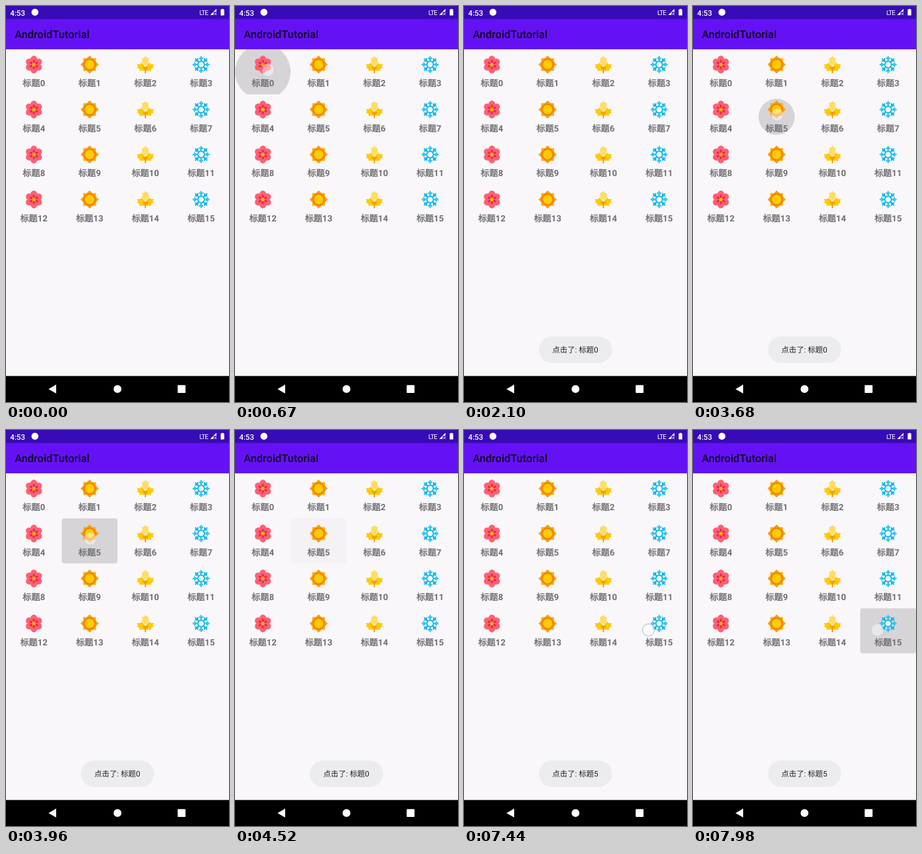
Animation, 320 px wide and 568 px high, one loop 8000 ms. Source, as an HTML page:

```html
<!DOCTYPE html>
<html lang="zh-CN">
<head>
<meta charset="utf-8">
<title>AndroidTutorial</title>
<style>
html, body { margin: 0; width: 100%; height: 100%; overflow: hidden; background: #f9f7fa; }
svg { display: block; width: 320px; height: 568px; font-family: Roboto, "Noto Sans CJK SC", "Noto Sans CJK", sans-serif; text-rendering: geometricPrecision; }
.label { font-size: 12.45px; font-weight: 700; fill: #6f6e70; text-anchor: middle; }
.han { font-weight: 400; stroke: #6f6e70; stroke-width: .45px; }
</style>
</head>
<body>
<svg viewBox="0 0 320 568">
  <defs>
    <clipPath id="cell"><rect id="cellBox" width="80" height="64.5"/></clipPath>
    <g id="flower"></g>
    <g id="sun">
      <path d="M-9.1-9.1H9.1V9.1H-9.1Z" fill="#ffab10"/>
      <path d="M0-13 13 0 0 13-13 0Z" fill="#f99d0c"/>
      <circle r="8.8" fill="#f08300"/>
      <circle r="6.7" fill="#ffcb05"/>
    </g>
    <g id="leaf">
      <path d="M0-12.6 2.2-9.8 4.8-9.6 4.4-5.5 5-3 0 1.5-5-3-4.4-5.5-4.8-9.6-2.2-9.8Z" fill="#ffdc62"/>
      <path id="lobe" d="M0 4.2-2.2.6-5.5-2.4-7.8-.6-12.2-.6-10.8 2.6-11.8 4.6-8.6 6.2-8 9.4-4.5 8.6-2 9.4 0 6.8Z" fill="#ffc905"/>
      <use href="#lobe" transform="scale(-1 1)"/>
      <path d="M0 3V12.5M0 7-3.5 3.5M0 7 3.5 3.5" fill="none" stroke="#f39a08" stroke-width="1.8"/>
    </g>
    <g id="snow"></g>
  </defs>

  <rect width="320" height="568" fill="#f9f7fa"/>
  <rect width="320" height="62.13" fill="#6412f5"/>
  <rect width="320" height="18.64" fill="#370bb5"/>
  <g fill="#fff">
    <text x="6" y="13.5" font-size="10.9" font-weight="500">4:53</text>
    <circle cx="41.5" cy="9" r="5"/>
    <text x="277.5" y="12.5" font-size="9.4" letter-spacing="-.8">LTE</text>
    <path d="M302 4V8.5H298L297.5 13H293Z"/>
    <path d="M299 9.8 302 12.8M302 9.8 299 12.8" stroke="#fff"/>
    <path d="M308 5H309.5V4H311.8V5H313.2V13.5H308Z"/>
  </g>
  <text x="12.44" y="46" font-size="15.56" font-weight="500" fill="#100722">AndroidTutorial</text>

  <circle id="ripple" clip-path="url(#cell)"/>
  <g id="grid"></g>

  <g id="toast">
    <rect x="107.5" y="474" width="105" height="38" rx="19" fill="#ececee"/>
    <text x="126.7" y="497" font-size="10.9" fill="#202021">点击了: 标题<tspan id="oldDigit">0</tspan><tspan id="newDigit" dx="-.5615em">5</tspan></text>
  </g>
  <circle id="pointer" r="8.7" fill="#fff" fill-opacity=".45" stroke="#a3bdd9"/>

  <rect y="530.7" width="320" height="37.3"/>
  <g fill="#fff">
    <path d="M61 549.4 72 543.1V555.7Z"/>
    <circle cx="160" cy="549.4" r="5.6"/>
    <rect x="246.4" y="543.8" width="11.2" height="11.2" rx=".8"/>
  </g>
</svg>
<script>
const $ = id => document.getElementById(id);
const set = (id, attrs) => { for (const k in attrs) $(id).setAttribute(k, attrs[k]); };
const ramp = (t, a, b) => Math.min(1, Math.max(0, (t - a) / (b - a)));
const smooth = p => p * p * (3 - 2 * p);
const spin = (n, draw) => Array.from({ length: n }, (_, i) => `<g transform="rotate(${i * 360 / n})">${draw(i)}</g>`).join('');
const ROW = 64.5, TOP = 62.13;

$('flower').innerHTML =
  spin(6, () => '<path d="M0 0-3.9-5.5A4.6 4.6 0 1 1 3.9-5.5Z" fill="#ff6074"/>') +
  spin(6, () => '<path d="M0 0-1.7-5Q0-9 1.7-5Z" fill="#e62a4c"/>') +
  '<circle r="2.6" fill="#fbb00a"/>';

$('snow').innerHTML = spin(8, i =>
  `<path d="M4 0H12.3M7.2 0 10-2.8M7.2 0 10 2.8" fill="none" stroke="${i % 2 ? '#12b4e8' : '#2cc4f0'}" stroke-width="1.9"/>`) +
  '<circle r="4.7" fill="#f4fbff" stroke="#1cb9ea" stroke-width="1.9"/>';

const icons = ['flower', 'sun', 'leaf', 'snow'];
$('grid').innerHTML = Array.from({ length: 16 }, (_, i) => {
  const x = 40 + i % 4 * 80, y = 84 + (i >> 2) * ROW;
  return `<use href="#${icons[i % 4]}" x="${x}" y="${y}"/><text class="label" x="${x}" y="${y + 31}"><tspan class="han">标题</tspan>${i}</text>`;
}).join('');

// show: pointer appears, down: ripple visible, start: ripple growth begins, up: release, end: ripple faded
const taps = [
  { cell: 0, x: 47.5, y: 92, show: 500, down: 560, start: 541, up: 880, end: 1300 },
  { cell: 5, x: 121, y: 156, show: 3160, down: 3680, start: 3643, up: 4080, end: 4600 },
  { cell: 15, x: 264.7, y: 286.7, show: 7440, down: 7560, start: 7540, up: 9000, end: 9400 }
];

function render(t) {
  if (t > 670 && t < 770) t = 670; // the screen stalls briefly
  const tap = taps.find(p => t >= p.show && t < p.end);
  const pressed = tap && t >= tap.down;
  const fade = tap ? 1 - ramp(t, tap.up, tap.end) : 0;

  if (tap) {
    const left = tap.cell % 4 * 80, top = TOP + (tap.cell >> 2) * ROW;
    set('cellBox', { x: left, y: top });
    set('ripple', {
      cx: left + 40, cy: top + ROW / 2,
      r: 24 + 26 * smooth(ramp(t, tap.start, tap.start + 225)),
      'fill-opacity': pressed ? .14 * fade : 0
    });
    set('pointer', {
      cx: tap.x, cy: tap.y,
      'stroke-opacity': pressed ? .25 : 1,
      opacity: (tap.cell === 5 ? ramp(t, 3140, 3300) : 1) * (1 - ramp(t, tap.up, tap.up + 120))
    });
  } else {
    set('ripple', { 'fill-opacity': 0 });
    set('pointer', { opacity: 0 });
  }

  const swap = smooth(ramp(t, 4540, 4960));
  set('toast', { opacity: smooth(ramp(t, 920, 1280)) });
  set('oldDigit', { 'fill-opacity': 1 - swap });
  set('newDigit', { 'fill-opacity': swap });
}

const begin = performance.now();
function tick() {
  render((performance.now() - begin) % 8000);
  requestAnimationFrame(tick);
}
tick();
</script>
</body>
</html>
```
